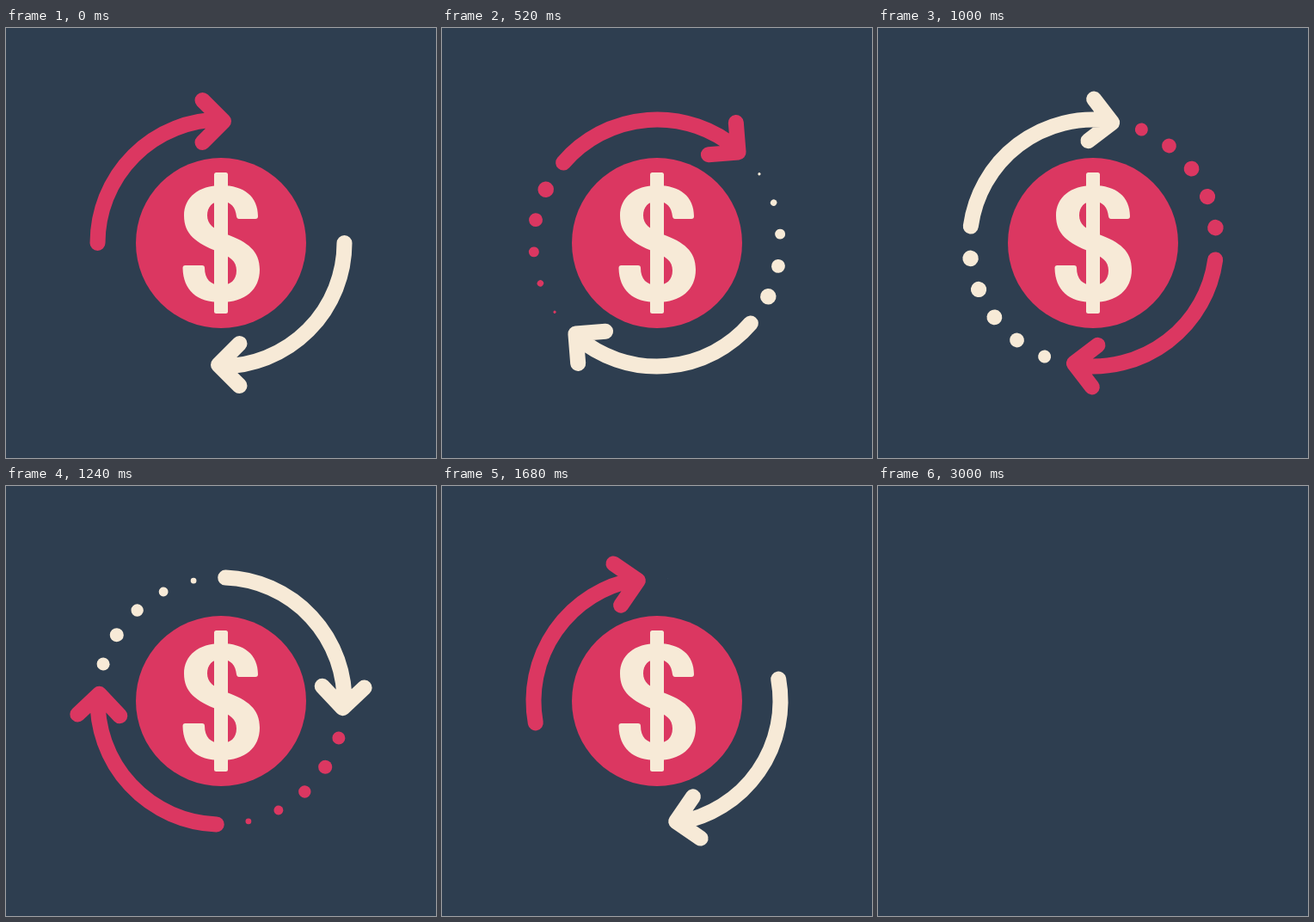
These frames come from a looping animation (500 px wide and 500 px high, 3040 ms). An HTML page with a canvas:

```html
<!DOCTYPE html>
<html lang="en">
<head>
<meta charset="utf-8">
<title>Money cycle</title>
<style>
  html, body { margin: 0; width: 100%; height: 100%; overflow: hidden; background: #2e3e50; }
  canvas { display: block; width: 500px; height: 500px; }
</style>
</head>
<body>
<canvas id="stage" width="500" height="500"></canvas>
<script>
const ctx = document.getElementById('stage').getContext('2d');
const BG = '#2e3e50', RED = '#db3761', CREAM = '#f7ead7';
const LOOP = 3040, STEP = 40, SPIN = 1960, BLANK = 3000;
const RADIUS = 143.5, RAD = Math.PI / 180, DOT_GAP = 14.93 * RAD;
const DOTS = [9.4, 9.15, 8.9, 8.4, 7.5];
const DOT_TIME = 460, DOT_DELAY = 72, GROW_AT = 92, SHRINK_AT = 967;

const dollar = new Path2D(`M293 219 C293 196 277 183 250 183 C224 183 207 197 207 218
  C207 240 221 250 246 260 C261 266 268 271 268 282 C268 293 261 299 250 299
  C238 299 231 292 231 279 Q231 276 228 276 L208.5 276 Q205.5 276 205.5 279
  C206 305 222 319 250 319 C278 319 295 304 295 281 C295 259 281 249 257 240
  C241 234 234 228 234 218 C234 208 240 201.5 250 201.5 C262 201.5 267 209 268 219
  Q268.5 222 271 222 L290 222 Q293 222 293 219 Z`);
const bar = new Path2D();
bar.roundRect(242, 168, 16, 164, 2.5);

const smooth = u => {
  u = Math.min(1, Math.max(0, u));
  return u * u * (3 - 2 * u);
};

// Symmetric cubic-bezier(a, 0, 1 - a, 1)
function ease(p) {
  const a = 0.528;
  let lo = 0, hi = 1;
  for (let i = 0; i < 30; i++) {
    const s = (lo + hi) / 2, r = 1 - s;
    const x = 3 * a * s * r * r + 3 * (1 - a) * s * s * r + s * s * s;
    if (x < p) lo = s; else hi = s;
  }
  return smooth(lo);
}

function disc(x, y, r, color) {
  ctx.fillStyle = color;
  ctx.beginPath();
  ctx.arc(x, y, r, 0, 2 * Math.PI);
  ctx.fill();
}

function arrow(angle, color, t) {
  ctx.save();
  ctx.translate(250, 250);
  ctx.rotate(angle);
  ctx.strokeStyle = color;
  ctx.lineWidth = 18;
  ctx.lineCap = ctx.lineJoin = 'round';
  ctx.beginPath();
  ctx.arc(0, 0, RADIUS, Math.PI, 1.5 * Math.PI);
  ctx.moveTo(-21.5, -166);
  ctx.lineTo(3, -141.7);
  ctx.lineTo(-21.5, -117);
  ctx.stroke();

  DOTS.forEach((size, i) => {
    const since = t - i * DOT_DELAY;
    const scale = smooth((since - GROW_AT) / DOT_TIME) - smooth((since - SHRINK_AT) / DOT_TIME);
    if (scale <= 0) return;
    const a = Math.PI - (i + 1) * DOT_GAP;
    disc(RADIUS * Math.cos(a), RADIUS * Math.sin(a), size * scale, color);
  });
  ctx.restore();
}

function draw(t) {
  ctx.fillStyle = BG;
  ctx.fillRect(0, 0, 500, 500);
  if (t >= BLANK) return;
  disc(250, 250, 99, RED);
  ctx.fillStyle = CREAM;
  ctx.fill(dollar);
  ctx.fill(bar);
  const turn = t >= SPIN ? 0 : 2 * Math.PI * ease(t / SPIN);
  arrow(turn, RED, t);
  arrow(turn + Math.PI, CREAM, t);
}

let start;
function tick(now) {
  start ??= now;
  draw(Math.floor(((now - start) % LOOP) / STEP) * STEP);
  requestAnimationFrame(tick);
}
draw(0);
requestAnimationFrame(tick);
</script>
</body>
</html>
```
